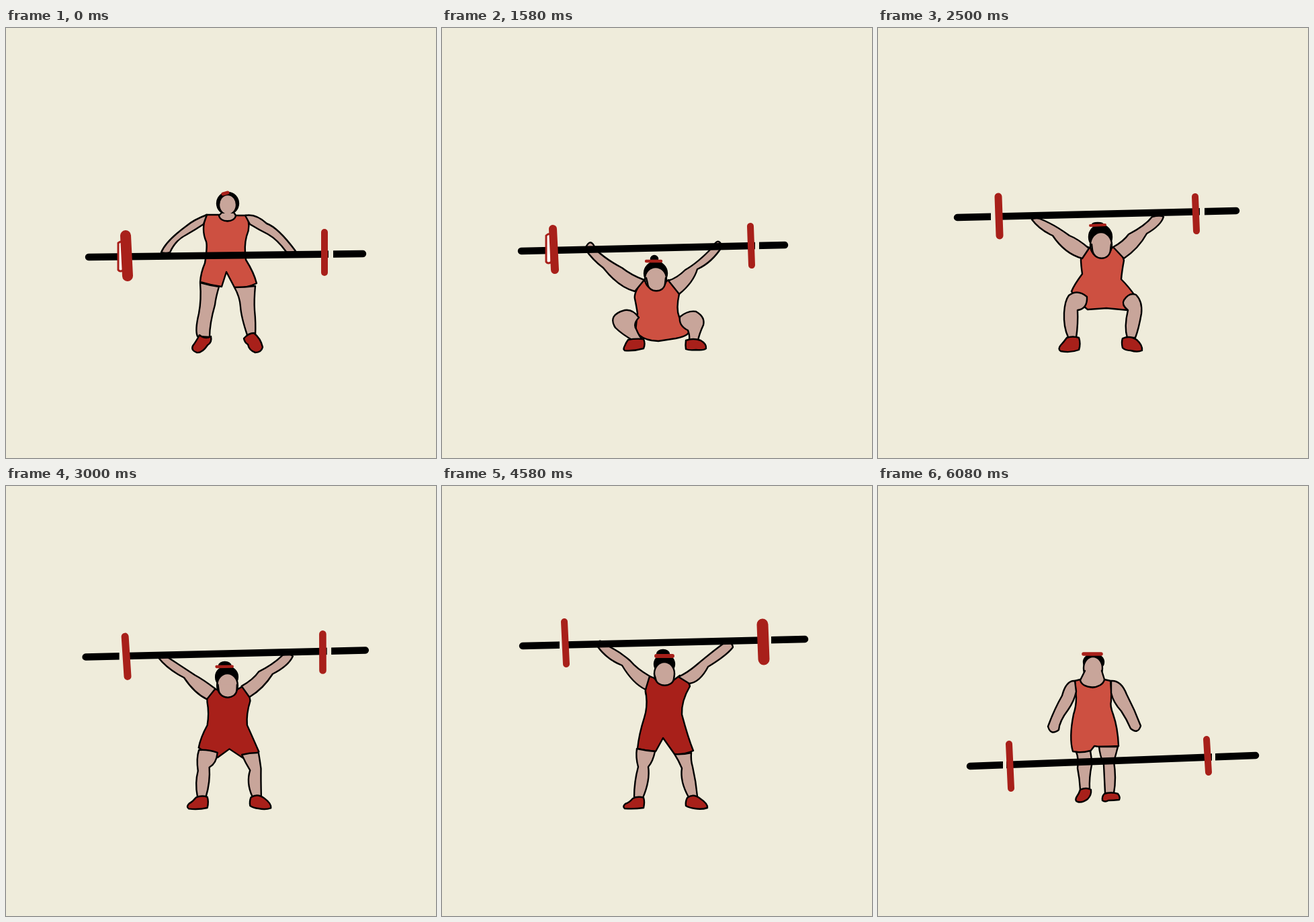
Animation of 640 by 640 pixels, one loop 6.26 s. Source, as an HTML page without scripts:

```html
<!DOCTYPE html>
<html lang="en">
<head>
<meta charset="utf-8">
<title>Weightlifter</title>
<style>
html, body { margin: 0; height: 100%; overflow: hidden; background: #efecdb; }
svg { display: block; width: 100vw; height: 100vh; }
svg * { animation: 6260ms steps(8) infinite; }
.lifter { fill: #c8a59a; stroke: #000; stroke-width: 2.4; stroke-linejoin: round; stroke-linecap: round; }
.shoe { fill: #a8201a; }
.iron { fill: none; stroke: #a8201a; stroke-linecap: round; }

#suit { animation-name: suit, tone; animation-timing-function: steps(8), step-end; }
#armL { animation-name: armL; } #armR { animation-name: armR; }
#legL { animation-name: legL; } #legR { animation-name: legR; }
#shoeL { animation-name: shoeL; } #shoeR { animation-name: shoeR; }
#bun { animation-name: bun; fill: #000; } #hair { animation-name: hair; fill: #000; }
#face { animation-name: face; } #neck { animation-name: neck; }
#band { animation-name: band; fill: none; stroke: #a8201a; stroke-width: 5; }
#barbell { animation-name: bounce; animation-timing-function: steps(2); }
#bar { animation-name: bar, blur; stroke-width: 10.5; }
#gaps { animation-name: gaps; stroke: #efecdb; stroke-width: 14; stroke-linecap: butt; }
#ring { animation-name: ring; fill: #fffdf6; stroke-width: 3; }
#plateL { animation-name: plateL; } #plateR { animation-name: plateR; }

/* Poses: pull, squat, rise, stand, hold, drop, step back */
@keyframes suit {
  0% { d: path("M298 278L317 278Q329 296 342 279L358 279Q365 294 358 310Q354 325 357 345Q369 364 373 380Q356 388 340 386L328 363L321 385Q305 383 289 378Q290 364 296 350Q300 325 298 318Q290 300 298 278Z"); animation-timing-function: steps(5); }
  6.7%, 25.24% { d: path("M299 375L306 379Q318 402 331 379L337 375Q350 387 353 396Q348 418 353 430Q356 440 367 449Q370 458 348 462L322 466L312 465Q298 463 288 452Q289 440 291 425Q289 412 287 403Q285 394 299 375Z"); animation-timing-function: steps(11); }
  39.94%, 41.28% { d: path("M312 326L318 328Q332 355 347 328L353 325Q364 335 366 346Q363 362 362 374Q374 386 382 398Q378 412 372 420L340 417L312 419Q300 410 288 392Q292 382 304 366Q302 352 302 344Q303 334 312 326Z"); }
  51.9%, 57.19% { d: path("M308 287L314 289Q328 308 342 288L352 282Q362 290 362 304Q354 326 357 345Q366 374 373 394Q358 399 343 397L328 376L317 395Q300 393 286 388Q288 370 297 350Q303 330 298 308Q294 298 308 287Z"); }
  73.16%, 81.15% { d: path("M309 283L316 286Q330 306 346 288L354 282Q368 290 369 298Q356 320 357 340Q366 374 374 394Q360 400 346 399L329 375L318 395Q304 394 291 391Q293 370 301 345Q306 330 304 312Q300 300 309 283Z"); animation-timing-function: steps(5); }
  87.86% { d: path("M303 290L314 287Q330 312 346 289L357 290Q365 303 362 315Q356 328 358 340Q368 365 370 394Q352 397 335 396L330 378L326 395Q308 391 290 389Q294 365 300 348Q308 332 303 322Q294 308 303 290Z"); animation-timing-function: steps(7); }
  97.12%, 100% { d: path("M293 290L301 288Q320 312 337 288L346 290Q348 305 347 320Q345 327 350 340Q357 360 358 387Q342 388 329 388L322 387L315 396Q300 397 290 395Q284 375 291 340Q295 328 295 315Q294 300 293 290Z"); }
}
@keyframes tone { 0%, 95.8%, 100% { fill: #cd5041; } 42.6% { fill: #a8201a; } }
@keyframes armL {
  0% { d: path("M299 278Q280 285 268 295Q238 317 231 334Q238 336 244 334Q252 316 268 308Q282 300 294 292Z"); animation-timing-function: steps(5); }
  6.7%, 25.24% { d: path("M301 375Q282 368 268 357Q245 345 229 330Q221 309 213 329Q225 346 240 357Q263 386 287 392Z"); animation-timing-function: steps(11); }
  39.94%, 41.28% { d: path("M314 328Q298 314 285 309Q262 292 241 284Q234 281 229 285Q240 300 260 309Q278 336 304 343Z"); }
  51.9%, 57.19% { d: path("M310 286Q290 272 279 265Q255 250 238 236Q230 224 225 237Q240 256 268 271Q282 292 296 302Z"); }
  73.16%, 81.15% { d: path("M309 283Q290 272 280 260Q262 244 240 235Q234 225 231 238Q245 258 268 267Q284 294 303 303Z"); animation-timing-function: steps(5); }
  87.86% { d: path("M303 290Q290 291 285 306Q268 335 261 364Q262 380 278 371Q278 350 291 332Q296 320 299 308Z"); animation-timing-function: steps(7); }
  97.12%, 100% { d: path("M293 290Q280 289 274 312Q262 333 253 358Q257 372 269 363Q270 350 283 333Q292 320 295 306Z"); }
}
@keyframes armR {
  0% { d: path("M356 279Q372 276 388 291Q405 297 431 332Q424 336 417 333Q404 315 390 307Q376 300 363 292Z"); animation-timing-function: steps(5); }
  6.7%, 25.24% { d: path("M337 376Q350 372 362 360Q380 350 403 326Q411 310 417 325Q402 349 380 359Q374 379 353 396Z"); animation-timing-function: steps(11); }
  39.94%, 41.28% { d: path("M350 326Q365 318 373 307Q398 294 408 281Q420 278 425 281Q421 294 400 306Q388 328 366 343Z"); }
  51.9%, 57.19% { d: path("M351 281Q370 270 378 258Q400 247 414 234Q424 230 428 237Q420 252 395 264Q380 286 360 297Z"); }
  73.16%, 81.15% { d: path("M352 284Q365 278 378 267Q398 250 418 235Q432 230 433 240Q424 252 396 269Q384 292 368 294Z"); animation-timing-function: steps(5); }
  87.86% { d: path("M358 290Q374 291 384 309Q392 331 409 362Q411 378 394 375Q386 365 386 346Q375 328 363 310Z"); animation-timing-function: steps(7); }
  97.12%, 100% { d: path("M347 290Q362 289 370 310Q382 333 391 357Q387 370 376 361Q370 347 362 335Q350 322 347 308Z"); }
}
@keyframes legL {
  0% { d: path("M289 379Q303 383 317 385Q312 402 311 412Q303 440 303 460L285 459Q281 450 287 425Q291 405 289 379Z"); animation-timing-function: steps(5); }
  6.7%, 25.24% { d: path("M272 420Q284 418 293 431Q284 440 289 448Q294 460 298 463L286 466Q268 456 258 446Q246 427 272 420Z"); animation-timing-function: steps(11); }
  39.94%, 41.28% { d: path("M284 398Q297 388 311 400Q312 418 297 420Q298 440 295 461L283 460Q276 445 277 424Q278 406 284 398Z"); }
  51.9%, 57.19% { d: path("M289 390Q302 394 317 395Q314 410 306 418Q308 440 299 464L286 463Q284 440 291 424Q286 405 289 390Z"); }
  73.16%, 81.15% { d: path("M290 391Q304 394 317 395Q314 410 307 418Q310 438 299 464L286 463Q286 440 292 418Q288 404 290 391Z"); animation-timing-function: steps(5); }
  87.86% { d: path("M290 389Q306 392 326 395Q320 402 311 414Q302 440 298 462L283 461Q283 440 288 424Q292 405 290 389Z"); animation-timing-function: steps(7); }
  97.12%, 100% { d: path("M295 396Q305 397 316 394Q318 404 318 415Q314 435 315 452L301 452Q300 435 297 420Q299 405 295 396Z"); }
}
@keyframes legR {
  0% { d: path("M340 386Q355 386 371 384Q369 405 370 420Q372 440 371 457L359 457Q350 430 349 415Q348 400 340 386Z"); animation-timing-function: steps(5); }
  6.7%, 25.24% { d: path("M354 430Q366 420 378 422Q392 430 389 442Q383 455 381 465L368 464Q369 458 366 450Q352 443 354 430Z"); animation-timing-function: steps(11); }
  39.94%, 41.28% { d: path("M366 405Q374 393 384 397Q394 407 392 425Q388 448 383 461L371 461Q366 445 372 420Q362 412 366 405Z"); }
  51.9%, 57.19% { d: path("M342 397Q357 399 371 397Q368 408 372 418Q374 430 378 463L364 463Q352 440 358 425Q352 410 342 397Z"); }
  73.16%, 81.15% { d: path("M346 399Q358 400 371 397Q370 408 373 418Q378 440 380 462L367 463Q354 440 357 420Q352 408 346 399Z"); animation-timing-function: steps(5); }
  87.86% { d: path("M340 396Q352 397 363 396Q362 410 360 424Q354 440 351 456L337 455Q339 440 341 424Q345 408 340 396Z"); animation-timing-function: steps(7); }
  97.12%, 100% { d: path("M329 388Q344 388 357 388Q354 400 351 410Q355 435 351 457L338 457Q337 435 336 415Q330 400 329 388Z"); }
}
@keyframes shoeL {
  0% { d: path("M288 457Q297 464 305 459Q307 468 300 472Q292 484 284 483Q275 480 278 473Q282 468 288 457Z"); animation-timing-function: steps(5); }
  6.7%, 25.24% { d: path("M277 464Q288 462 300 463Q303 470 300 477Q286 481 272 480Q269 478 272 473Q274 468 277 464Z"); animation-timing-function: steps(11); }
  39.94%, 41.28% { d: path("M281 461Q290 458 299 461Q302 470 299 479Q286 484 272 481Q267 478 272 472Q276 468 281 461Z"); }
  51.9%, 81.15% { d: path("M284 465Q292 461 300 464Q302 470 300 479Q286 481 272 480Q268 477 273 473Q279 471 284 465Z"); animation-timing-function: steps(5); }
  87.86% { d: path("M284 461Q292 460 298 463Q300 470 297 476Q286 480 277 480Q272 478 275 472Q281 468 284 461Z"); animation-timing-function: steps(7); }
  97.12%, 100% { d: path("M301 452Q310 448 317 452Q318 460 312 466Q304 472 297 470Q292 468 296 462Q299 458 301 452Z"); }
}
@keyframes shoeR {
  0% { d: path("M354 462Q361 454 369 454Q379 462 382 475Q380 483 371 483Q362 480 360 471Q355 468 354 462Z"); animation-timing-function: steps(5); }
  6.7%, 25.24% { d: path("M363 465Q374 461 385 465Q394 470 393 477Q390 480 378 479Q368 480 363 478Q362 472 363 465Z"); animation-timing-function: steps(11); }
  39.94%, 41.28% { d: path("M364 462Q375 457 385 464Q394 472 393 480Q386 483 376 480Q368 480 364 476Q362 468 364 462Z"); }
  51.9%, 81.15% { d: path("M365 464Q374 457 384 465Q396 473 395 479Q386 482 376 480Q368 479 363 476Q362 470 365 464Z"); animation-timing-function: steps(5); }
  87.86% { d: path("M336 456Q344 453 351 456Q357 465 356 471Q350 477 345 475Q338 476 335 473Q334 464 336 456Z"); animation-timing-function: steps(7); }
  97.12%, 100% { d: path("M337 458Q347 455 357 458Q361 463 359 467Q350 468 343 468Q338 471 334 468Q333 462 337 458Z"); }
}
@keyframes neck {
  0% { d: path("M320 276L317 279C318 290 341 290 342 279L340 276"); animation-timing-function: steps(5); }
  6.7%, 25.24% { d: path("M304 372L306 380C307 395 331 395 332 380L333 372"); animation-timing-function: steps(11); }
  39.94%, 41.28% { d: path("M318 322L319 330C321 347 345 347 346 330L347 322"); }
  51.9%, 57.19% { d: path("M314 280L315 288C317 301 340 301 342 288L342 280"); }
  73.16%, 81.15% { d: path("M316 280L318 287C320 300 343 300 345 287L346 280"); animation-timing-function: steps(5); }
  87.86% { d: path("M316 277L314 290C315 302 345 302 346 290L342 277"); animation-timing-function: steps(7); }
  97.12%, 100% { d: path("M308 275L301 289C304 303 334 303 337 288L333 275"); }
}
@keyframes face {
  0% { cx: 330px; cy: 263px; rx: 13px; ry: 15px; animation-timing-function: steps(5); }
  6.7%, 25.24% { cx: 318px; cy: 373px; rx: 16px; ry: 17px; animation-timing-function: steps(11); }
  39.94%, 41.28% { cx: 332px; cy: 323px; rx: 16px; ry: 19px; }
  51.9%, 57.19% { cx: 328px; cy: 281px; rx: 15px; ry: 17px; }
  73.16%, 81.15% { cx: 331px; cy: 279px; rx: 15px; ry: 17px; animation-timing-function: steps(5); }
  87.86% { cx: 329px; cy: 272px; rx: 14px; ry: 16px; animation-timing-function: steps(7); }
  97.12%, 100% { cx: 320px; cy: 271px; rx: 14px; ry: 17px; }
}
@keyframes hair {
  0% { cx: 330px; cy: 261px; rx: 16px; ry: 16px; animation-timing-function: steps(5); }
  6.7%, 25.24% { cx: 318px; cy: 365px; rx: 17px; ry: 17px; animation-timing-function: steps(11); }
  39.94%, 41.28% { cx: 331px; cy: 311px; rx: 17px; ry: 18px; }
  51.9%, 57.19% { cx: 327px; cy: 268px; rx: 16px; ry: 14px; }
  73.16%, 81.15% { cx: 331px; cy: 265px; rx: 15px; ry: 14px; animation-timing-function: steps(5); }
  87.86% { cx: 328px; cy: 262px; rx: 13px; ry: 9px; animation-timing-function: steps(7); }
  97.12%, 100% { cx: 321px; cy: 262px; rx: 15px; ry: 12px; }
}
@keyframes bun {
  0% { cx: 330px; cy: 258px; rx: 9px; ry: 6px; animation-timing-function: steps(5); }
  6.7%, 25.24% { cx: 316px; cy: 344px; rx: 5px; ry: 5px; animation-timing-function: steps(11); }
  39.94%, 41.28% { cx: 327px; cy: 293px; rx: 8px; ry: 3px; }
  51.9%, 57.19% { cx: 325px; cy: 252px; rx: 9px; ry: 7px; }
  73.16%, 81.15% { cx: 329px; cy: 250px; rx: 9px; ry: 6px; animation-timing-function: steps(5); }
  87.86% { cx: 328px; cy: 261px; rx: 9px; ry: 6px; animation-timing-function: steps(7); }
  97.12%, 100% { cx: 321px; cy: 261px; rx: 9px; ry: 6px; }
}
@keyframes band {
  0% { d: path("M323 247L330 245"); animation-timing-function: steps(5); }
  6.7%, 25.24% { d: path("M304 347L326 347"); animation-timing-function: steps(11); }
  39.94%, 41.28% { d: path("M316 294L338 293"); stroke-width: 4; }
  51.9%, 57.19% { d: path("M312 254L336 254"); }
  73.16%, 81.15% { d: path("M319 253L343 253"); animation-timing-function: steps(5); }
  87.86% { d: path("M318 251L336 251"); stroke-width: 7; animation-timing-function: steps(7); }
  97.12%, 100% { d: path("M306 250L332 250"); }
}
@keyframes bar {
  0% { d: path("M123 341L531 336"); animation-timing-function: steps(5); }
  6.7%, 25.24% { d: path("M118 332L510 323"); animation-timing-function: steps(11); }
  39.94%, 41.28% { d: path("M118 282L533 272"); }
  51.9%, 57.19% { d: path("M119 238L536 228"); }
  73.16%, 82.54% { d: path("M120 238L540 228"); animation-timing-function: steps(4); }
  87.86% { d: path("M128 394L547 397"); animation-timing-function: steps(7); }
  97.12%, 100% { d: path("M137 417L562 401"); }
}
@keyframes blur {
  0%, 82.54%, 89.2%, 100% { stroke: #000; stroke-width: 10.5; }
  87.86% { stroke: #5b5044; stroke-width: 9; }
}
@keyframes gaps {
  0% { d: path("M168 341L168 341M480 336L487 336"); animation-timing-function: steps(5); }
  6.7%, 25.24% { d: path("M155 331L155 331M466 324L472 324"); animation-timing-function: steps(11); }
  39.94%, 41.28% { d: path("M168 281L175 281M479 273L486 273"); }
  51.9%, 57.19% { d: path("M169 236L174 236M477 229L483 229"); }
  73.16%, 82.54% { d: path("M175 237L180 237M485 229L490 229"); animation-timing-function: steps(4); }
  87.86% { d: path("M175 394L179 394M485 397L490 397"); animation-timing-function: steps(7); }
  97.12%, 100% { d: path("M186 416L191 416M497 403L502 403"); }
}
@keyframes ring {
  0% { d: path("M167 320Q172 316 175 320L175 360Q170 364 167 360Z"); animation-timing-function: steps(5); }
  6.7%, 25.24% { d: path("M155 309Q160 304 163 309L163 348Q158 352 155 348Z"); opacity: 1; animation-timing-function: step-end; }
  27%, 100% { d: path("M155 309Q160 304 163 309L163 348Q158 352 155 348Z"); opacity: 0; }
}
@keyframes plateL {
  0% { d: path("M178 309L181 369"); stroke-width: 16; animation-timing-function: steps(5); }
  6.7%, 25.24% { d: path("M165 299L168 360"); stroke-width: 12; animation-timing-function: steps(11); }
  39.94%, 41.28% { d: path("M179 251L181 309"); stroke-width: 11; }
  51.9%, 57.19% { d: path("M176 208L181 268"); stroke-width: 11; }
  73.16%, 82.54% { d: path("M182 202L185 265"); stroke-width: 10; animation-timing-function: steps(4); }
  87.86% { d: path("M184 363L182 424"); stroke-width: 11; animation-timing-function: steps(7); }
  97.12%, 100% { d: path("M195 384L198 450"); stroke-width: 10; }
}
@keyframes plateR {
  0% { d: path("M474 304L474 364"); stroke-width: 10; animation-timing-function: steps(5); }
  6.7%, 25.24% { d: path("M459 295L461 353"); stroke-width: 10; animation-timing-function: steps(11); }
  39.94%, 41.28% { d: path("M472 251L474 302"); stroke-width: 10; }
  51.9%, 57.19% { d: path("M471 202L470 258"); stroke-width: 11; }
  73.16%, 82.54% { d: path("M477 206L479 258"); stroke-width: 17; animation-timing-function: steps(4); }
  87.86% { d: path("M476 367L478 417"); stroke-width: 16; animation-timing-function: steps(7); }
  97.12%, 100% { d: path("M489 377L492 426"); stroke-width: 10; }
}
@keyframes bounce {
  0%, 82.54%, 87.86%, 97.12%, 100% { transform: none; }
  83.87% { transform: translateY(-23px); }
  89.2%, 94.6% { transform: translateY(28px); }
  92% { transform: translateY(5px); }
}
</style>
</head>
<body>
<svg viewBox="0 0 640 640">
  <g class="lifter">
    <path id="suit"/>
    <path id="legL"/><path id="legR"/>
    <path id="shoeL" class="shoe"/><path id="shoeR" class="shoe"/>
    <path id="armL"/><path id="armR"/>
    <ellipse id="bun"/><ellipse id="hair"/><ellipse id="face"/>
    <path id="neck"/><path id="band"/>
  </g>
  <g id="barbell" class="iron">
    <path id="bar"/><path id="gaps"/><path id="ring"/>
    <path id="plateL"/><path id="plateR"/>
  </g>
</svg>
</body>
</html>
```
